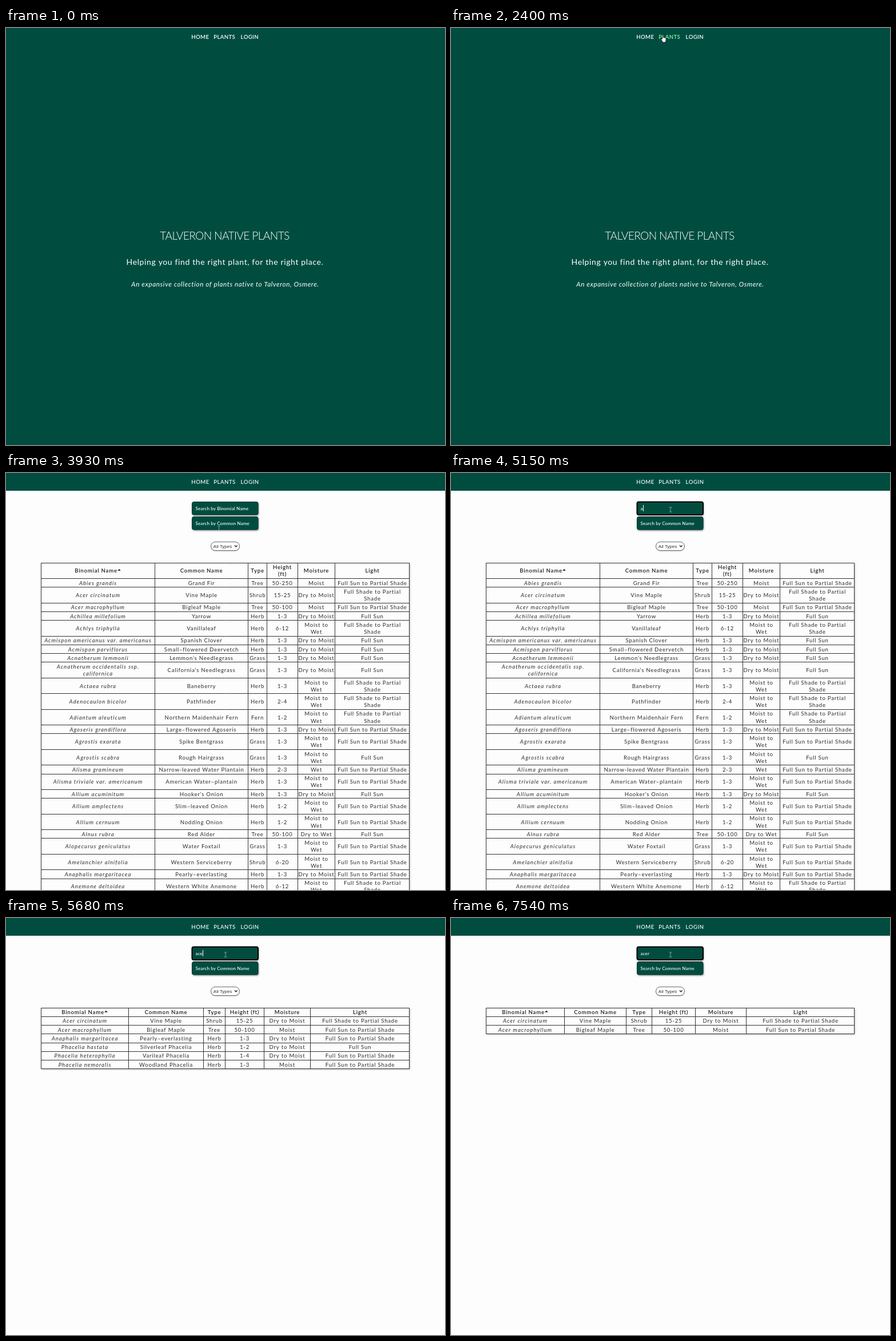
Recreate the animation shown at these times as an HTML page with a canvas. Size 768 px wide and 729 px high, loop 8 s.

```html
<!DOCTYPE html>
<html lang="en">
<head>
<meta charset="utf-8">
<title>Plant finder</title>
<style>
html, body { margin: 0; width: 100%; height: 100%; overflow: hidden; background: #fdfdfd; }
canvas { display: block; }
</style>
</head>
<body>
<canvas id="stage" width="768" height="729"></canvas>
<script>
const ctx = document.getElementById('stage').getContext('2d');
const LOOP = 8000, W = 768, H = 729;
const GREEN = '#004d40', INK = '#2b2b2b';
const SANS = 'Lato, "Open Sans", sans-serif';

// "/" marks where a cell wraps when the columns are tight
const MOISTURE = { m: 'Moist', d: 'Dry to Moist', w: 'Moist to/Wet', x: 'Wet', a: 'Dry to Wet' };
const LIGHT = { p: 'Full Sun to Partial Shade', s: 'Full Shade to Partial/Shade', f: 'Full Sun' };
const PLANTS = `Abies grandis|Grand Fir|Tree|50-250|m|p
Acer circinatum|Vine Maple|Shrub|15-25|d|s
Acer macrophyllum|Bigleaf Maple|Tree|50-100|m|p
Achillea millefolium|Yarrow|Herb|1-3|d|f
Achlys triphylla|Vanillaleaf|Herb|6-12|w|s
Acmispon americanus var. americanus|Spanish Clover|Herb|1-3|d|f
Acmispon parviflorus|Small–flowered Deervetch|Herb|1-3|d|f
Acnatherum lemmonii|Lemmon’s Needlegrass|Grass|1-3|d|f
Acnatherum occidentalis ssp./californica|California’s Needlegrass|Grass|1-3|d|f
Actaea rubra|Baneberry|Herb|1-3|w|s
Adenocaulon bicolor|Pathfinder|Herb|2-4|w|s
Adiantum aleuticum|Northern Maidenhair Fern|Fern|1-2|w|s
Agoseris grandiflora|Large–flowered Agoseris|Herb|1-3|d|p
Agrostis exarata|Spike Bentgrass|Grass|1-3|w|p
Agrostis scabra|Rough Hairgrass|Grass|1-3|w|f
Alisma gramineum|Narrow-leaved Water Plantain|Herb|2-3|x|p
Alisma triviale var. americanum|American Water–plantain|Herb|1-3|w|p
Allium acuminitum|Hooker’s Onion|Herb|1-3|d|f
Allium amplectens|Slim–leaved Onion|Herb|1-2|w|p
Allium cernuum|Nodding Onion|Herb|1-2|w|p
Alnus rubra|Red Alder|Tree|50-100|a|f
Alopecurus geniculatus|Water Foxtail|Grass|1-3|w|p
Amelanchier alnifolia|Western Serviceberry|Shrub|6-20|w|p
Anaphalis margaritacea|Pearly–everlasting|Herb|1-3|d|p
Anemone deltoidea|Western White Anemone|Herb|6-12|w|s
Aruncus dioicus var. acuminatus|Goatsbeard|Herb|3-6|w|s
Beckmania syzigachne|Slough Grass|Grass|2-4|x|p
Beckmannia syzigachne|Slough Grass|Grass|2-5|w|p
Carex athrostachya|Slenderbeaked Sedge|Sedge|2-4|w|p
Coptis laciniata|Cutleaf Goldthread|Herb|6-12|w|s
Crataegus gaylussacia|Suksdorf’s hawthorn|Tree|6-15|d|p
Eleocharis acicularis|Needle Spike–rush|Rush|1-2|x|p
Elymus trachycaulus|Bluebunch Wheatgrass|Grass|1-4|d|f
Epilobium brachycarpum var. pan.|Tall Annual Willow Herb|Herb|1-3|d|p
Fragaria vesca var. bracteata|Wood Strawberry|Herb|6-12|d|p
Geum macrophyllum|Oregon Avens|Herb|1-2|w|s
Heracleum maximum|Cow Parsnip|Herb|3-10|w|p
Hieracium albiflorum|White–flowered Hawkweed|Herb|1-3|d|p
Hordeum brachyantherum|Meadow Barley|Grass|1-2|w|p
Juncus acuminatus|Tapertip Rush|Rush|1-3|w|p
Phacelia hastata|Silverleaf Phacelia|Herb|1-2|d|f
Phacelia heterophylla|Varileaf Phacelia|Herb|1-4|d|p
Phacelia nemoralis|Woodland Phacelia|Herb|1-3|m|p`.split('\n').map(line => {
  const c = line.split('|');
  return [c[0], c[1], c[2], c[3], MOISTURE[c[4]], LIGHT[c[5]]];
});
const HEAD = ['Binomial Name', 'Common Name', 'Type', 'Height/(ft)', 'Moisture', 'Light'];

// Column edges for each number of typed letters
const EDGES = [
  [61, 260, 423, 456, 510, 575, 706],
  [61, 260, 423, 456, 510, 575, 706],
  [61, 266, 415, 448, 503, 570, 706],
  [61, 214, 345, 383, 451, 532, 706],
  [61, 198, 306, 351, 427, 516, 706]
];

function text(str, x, y, font, spacing, color, align = 'left') {
  ctx.font = font;
  ctx.letterSpacing = spacing + 'px';
  ctx.fillStyle = color;
  ctx.textAlign = align;
  ctx.fillText(str, x, y);
}

function box(x, y, w, h, r, fill, stroke, line = 1) {
  ctx.beginPath();
  ctx.roundRect(x, y, w, h, r);
  ctx.fillStyle = fill;
  ctx.fill();
  ctx.shadowColor = 'transparent';
  ctx.strokeStyle = stroke;
  ctx.lineWidth = line;
  ctx.stroke();
}

function shadow(color, blur, dx, dy) {
  ctx.shadowColor = color;
  ctx.shadowBlur = blur;
  ctx.shadowOffsetX = dx;
  ctx.shadowOffsetY = dy;
}

function nav(hover, weight, spacing) {
  const font = `${weight} 9.6px ${SANS}`;
  text('HOME', 324.3, 19, font, spacing, '#fff');
  text('PLANTS', 363.3, 19, font, spacing, hover ? '#7dff9a' : '#fff');
  text('LOGIN', 410.6, 19, font, spacing, '#fff');
}

function home(hover) {
  ctx.fillStyle = GREEN;
  ctx.fillRect(0, 0, W, H);
  nav(hover, 600, 0.35);
  text('TALVERON NATIVE PLANTS', 382.5, 370, `300 19.2px ${SANS}`, -0.64, '#fff', 'center');
  text('Helping you find the right plant, for the right place.', 383, 413.5,
    `400 14px ${SANS}`, 0.63, '#fff', 'center');
  text('An expansive collection of plants native to Talveron, Osmere.', 383.5, 451.5,
    `italic 400 11.6px ${SANS}`, 0.62, '#fff', 'center');
}

function field(y, value, hint, focused, caret) {
  shadow('rgba(0,0,0,.55)', 3, 1, 1.5);
  box(325.5, y + 0.5, 115.5, 22.5, 3, GREEN, focused ? '#000' : '#06352d', focused ? 2 : 1);
  text(value || hint, 331.5, y + 14.8, `500 8.1px ${SANS}`, 0.1, '#fff');
  if (caret) {
    const x = 332 + (value ? ctx.measureText(value).width : 0);
    ctx.fillRect(Math.round(x), y + 6, 1, 11);
  }
}

function typePicker() {
  shadow('rgba(0,0,0,.3)', 2, 0, 1);
  box(358.5, 120.5, 50, 15, 7.5, '#fff', '#6b6b6b');
  text('All Types', 362.8, 130.6, '8px "Liberation Sans", Arial, sans-serif', 0, '#333');
  ctx.beginPath();
  ctx.moveTo(400, 126.5);
  ctx.lineTo(402.3, 129);
  ctx.lineTo(404.6, 126.5);
  ctx.strokeStyle = '#222';
  ctx.lineWidth = 1.3;
  ctx.stroke();
}

function table(query) {
  const edges = EDGES[query.length], wide = query.length > 2;
  const rows = [HEAD, ...PLANTS.filter(p => p[0].toLowerCase().includes(query))];
  const cells = rows.map(r => r.map(c => wide ? [c.replace('/', ' ')] : c.split('/')));
  const tall = cells.map(r => r.some(c => c.length > 1) ? 27.45 : 15.25);
  const height = tall.reduce((a, b) => a + b, 0);
  const bottom = Math.round(157 + height);

  shadow('rgba(0,0,0,.4)', 3, 0.5, 0.5);
  ctx.fillStyle = '#fdfdfd';
  ctx.fillRect(61, 157, 645, bottom - 157);
  ctx.shadowColor = 'transparent';

  ctx.strokeStyle = '#333';
  ctx.lineWidth = 1;
  ctx.beginPath();
  for (const x of edges) {
    const px = Math.min(x, 705) + 0.5;
    ctx.moveTo(px, 157);
    ctx.lineTo(px, bottom);
  }
  let y = 157;
  for (let i = 0; i <= cells.length && y < H; i++) {
    const py = Math.floor(y) + 0.5;
    ctx.moveTo(61, py);
    ctx.lineTo(706, py);
    y += tall[i] || 0;
  }
  ctx.stroke();

  y = 157;
  for (let i = 0; i < cells.length && y < H; i++) {
    const mid = y + tall[i] / 2 + 0.3;
    cells[i].forEach((lines, col) => {
      const italic = i && !col;
      const font = `${italic ? 'italic ' : ''}${i ? 400 : 600} 9.6px ${SANS}`;
      const x = (edges[col] + edges[col + 1]) / 2 + (i || col ? 0.5 : -3);
      lines.forEach((line, n) => {
        const base = mid + 3.3 + (n - (lines.length - 1) / 2) * 12.1;
        text(line, x, base, font, italic ? 1.03 : 0.78, i ? INK : '#1c1c1c', 'center');
      });
      if (!i && !col) {
        const tip = x + ctx.measureText(lines[0]).width / 2 + 3.2;
        ctx.beginPath();
        ctx.moveTo(tip - 2.8, mid - 0.3);
        ctx.lineTo(tip, mid - 3.2);
        ctx.lineTo(tip + 2.8, mid - 0.3);
        ctx.fill();
      }
    });
    y += tall[i];
  }
}

function list(hover, query, focused, caret) {
  ctx.fillStyle = '#fdfdfd';
  ctx.fillRect(0, 0, W, H);
  ctx.fillStyle = GREEN;
  ctx.fillRect(0, 0, W, 31);
  nav(hover, 500, 0.5);
  field(50, query, 'Search by Binomial Name', focused, caret);
  field(76, '', 'Search by Common Name', false, false);
  typePicker();
  table(query);
}

const ARROW = new Path2D('M0 0V10.5L2.4 8.3L4 12L5.6 11.3L4 7.8H7.3Z');
const HAND = new Path2D('M2.6 7.5V1.2Q3.4 0 4.3 1.2V4.6Q5.2 4 5.9 5Q6.9 4.4 7.5 5.5Q8.8 5 9 6.4V9.5Q8.8 11 8 13H3.6Q2.6 10.8.6 8.2Q.4 6.9 1.5 6.9Z');
const BEAM = new Path2D('M-2.5-4H-.6L0-3.5L.6-4H2.5M0-3.5V3.5M-2.5 4H-.6L0 3.5L.6 4H2.5');

function pointer(kind, x, y) {
  ctx.save();
  ctx.translate(x, y);
  ctx.lineWidth = 0.8;
  if (kind === BEAM) {
    ctx.strokeStyle = '#a9bdb8';
    ctx.stroke(kind);
  } else {
    ctx.fillStyle = '#fff';
    ctx.strokeStyle = '#111';
    ctx.fill(kind);
    ctx.stroke(kind);
  }
  ctx.restore();
}

const glide = (t, start, span) => Math.min(1, Math.max(0, (t - start) / span));
const bend = (a, b, c, s) => (1 - s) ** 2 * a + 2 * s * (1 - s) * b + s * s * c;

function cursor(t) {
  if (t < 260 || (t >= 1860 && t < 2260)) return null;
  if (t < 1860) {
    const s = 1 - (1 - glide(t, 260, 1600)) ** 1.45;
    return { kind: ARROW, x: bend(752, 695, 366, s), y: bend(729, 255, 24, s) };
  }
  if (t < 2400) return { kind: HAND, x: 366, y: 5 };
  if (t < 3730) return { kind: HAND, x: 367, y: 12 };
  const u = glide(t, 3700, 720);
  const x = 367 + 17 * u, y = 14 + 50 * u + 79 * Math.sin(Math.PI * u);
  const kind = y < 23 ? HAND : y > 50 && y < 100 ? BEAM : ARROW;
  return { kind, x, y };
}

function draw(t) {
  const c = cursor(t);
  const hover = t >= 1860 && t < 3730 || (c && c.kind === HAND);
  shadow('transparent', 0, 0, 0);
  if (t < 2470) {
    home(hover);
  } else {
    const typed = [5150, 5420, 5680, 6020].filter(k => t >= k).length;
    const focused = t >= 4420;
    const caret = focused && !(t >= 4890 && t < 5150) && !(t >= 6540 && t < 7010) && t < 7540;
    list(hover, 'acer'.slice(0, typed), focused, caret);
  }
  if (c) pointer(c.kind, c.x, c.y);
}

const begin = performance.now();
function tick() {
  draw((performance.now() - begin) % LOOP);
  requestAnimationFrame(tick);
}
tick();
</script>
</body>
</html>
```
